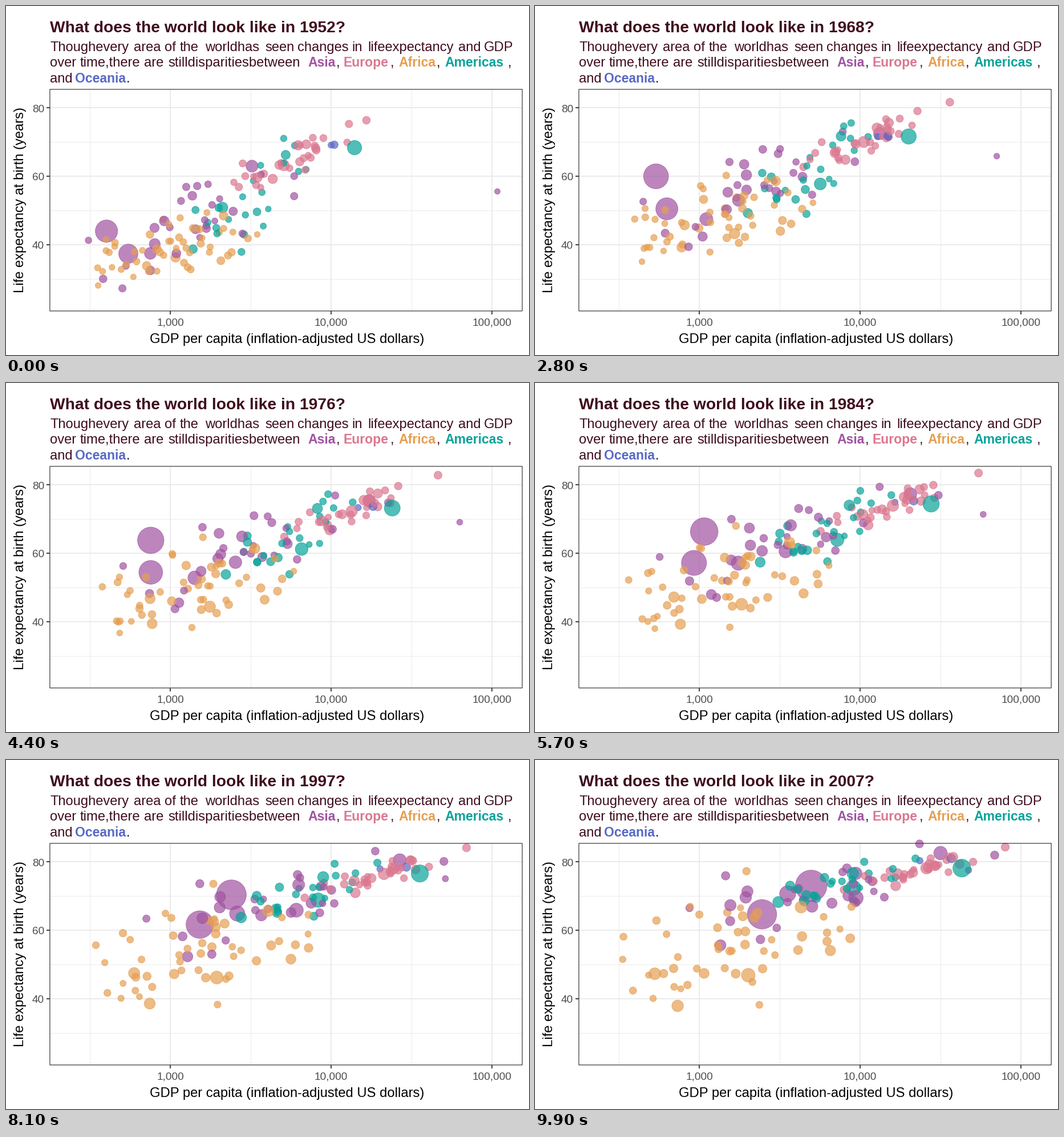
Write a matplotlib script that moves like this. It is 917x611 px and loops after 10 s.

```python
import numpy as np
import matplotlib.pyplot as plt
from matplotlib.animation import FuncAnimation
from matplotlib.colors import to_rgba
from matplotlib.patches import Rectangle

W, H, FRAMES = 917, 611, 100
LEFT, TOP, RIGHT, BOTTOM = 76.9, 145.9, 905.1, 533.9
INK, AXIS, GRID, TICK = "#3F0D1D", "#333333", "#EBEBEB", "#4D4D4D"
COLORS = {"Asia": "#A053A1", "Europe": "#DB778F", "Africa": "#E69F52",
          "Americas": "#09A39A", "Oceania": "#5869C7"}

rng = np.random.default_rng(14)


def to_x(log_gdp):
    return 288.3 + 281.7 * (log_gdp - 3)


def to_y(life):
    return 178.5 + 5.99 * (80 - life)


def radius(pop):
    return 4.6 + 23 * np.sqrt(pop / 1319)


def tween(ends, t, power=1.0):
    a, b = ends
    return a + (b - a) * t ** power


def single(pop, gdp, life, ease):
    """One large country, eased from its first to its last values."""
    ends, logs = radius(np.array(pop)), np.log10(gdp)

    def at(t):
        return ([to_x(tween(logs, t, ease[0]))],
                [to_y(tween(life, t, ease[1]))], [tween(ends, t)])
    return at


def crowd(n, pop, growth, corr, gdp, gdp_sd, life, life_sd, ease):
    """A correlated cloud whose centre and spread follow the trend."""
    def scores():
        z = rng.normal(size=n)
        return np.clip((z - z.mean()) / z.std(), -2, 2)

    u0, u1, v0, v1 = (scores() for _ in range(4))
    pops = pop * 10 ** (.42 * scores())

    def at(t):
        c, s = np.cos(.7 * t), np.sin(.7 * t)
        u = c * u0 + s * u1
        v = corr * u + np.sqrt(1 - corr ** 2) * (c * v0 + s * v1)
        g = tween(gdp, t, ease[0]) + tween(gdp_sd, t) * u
        y = tween(life, t, ease[1]) + tween(life_sd, t) * v
        return to_x(g), to_y(y), tween((radius(pops), radius(pops * growth)), t)
    return at


# Each entry runs from 1952 to 2007: population in millions, GDP, life
# expectancy, and the easing powers of the last two.
GROUPS = [
    ("Asia", 1, single((556, 1319), (400, 4959), (44, 73), (1.7, .47))),
    ("Asia", 1, single((372, 1110), (547, 2452), (37.4, 64.7), (1.9, .58))),
    ("Asia", 1, single((82, 224), (750, 3541), (37.5, 70.7), (1.1, .95))),
    ("Asia", 1, single((86, 127), (3217, 31656), (63, 82.6), (.38, .57))),
    ("Asia", 1, single((.2, 2.5), (108382, 47307), (55.6, 77.6), (.53, .6))),
    ("Africa", 1, single((33, 135), (1077, 2014), (36.3, 46.9), (.3, .33))),
    ("Americas", 1, single((57, 190), (2109, 9066), (50.9, 72.4), (.31, .9))),
    ("Asia", 28, crowd(28, 9, 2.7, .6, (3.13, 3.72), (.32, .46),
                       (46.5, 70.5), (8, 6), (.7, .6))),
    ("Africa", 51, crowd(51, 3.5, 3.4, .4, (3.0, 3.2), (.27, .38),
                         (39, 55), (4.8, 8.5), (.6, .5))),
    ("Europe", 30, crowd(30, 9, 1.3, .85, (3.76, 4.38), (.23, .2),
                         (65, 77.8), (4.8, 2.5), (.6, .6))),
    ("Americas", 23, crowd(23, 4, 2.8, .6, (3.5, 3.88), (.2, .24),
                           (53, 73.5), (8.5, 3.3), (.55, .7))),
    ("Oceania", 2, crowd(2, 4.2, 2.2, .9, (4.01, 4.47), (.01, .07),
                         (69.2, 80.7), (.1, .5), (1, 1.2))),
]
# Continents are mixed in depth, above the giants and below the last bubble.
total = sum(n for _, n, _ in GROUPS)
order = np.append(np.arange(7), 7 + rng.permutation(total - 7))
fills = np.array([to_rgba(COLORS[name], .7)
                  for name, n, _ in GROUPS for _ in range(n)])[order]
top_dog = single((158, 301), (13990, 42952), (68.4, 78.2), (.9, .87))
fills = np.vstack([fills, to_rgba(COLORS["Americas"], .7)])


def state(t):
    """Pixel centres and marker areas of all bubbles."""
    x, y, r = np.hstack([at(t) for _, _, at in GROUPS])[:, order]
    x, y, r = np.hstack([(x, y, r), top_dog(t)])
    return np.column_stack([x, y]), (2 * r) ** 2


# At 72 dpi one point is one pixel.
plt.rcParams["font.family"] = "Liberation Sans"
fig = plt.figure(figsize=((W + .01) / 72, (H + .01) / 72), dpi=72,
                 facecolor="white")
ax = fig.add_axes([0, 0, 1, 1])
ax.set(xlim=(0, W), ylim=(H, 0))
ax.axis("off")


def label(x, y, s, size=23.7, color=INK, **kw):
    return ax.text(x, y, s, fontsize=size, color=color, **kw)


for logs, lives, lw in (((2.5, 3.5, 4.5), (30, 50, 70), 1),
                        ((3, 4, 5), (40, 60, 80), 2)):
    ax.vlines([to_x(g) for g in logs], TOP, BOTTOM, color=GRID, lw=lw, zorder=1)
    ax.hlines([to_y(v) for v in lives], LEFT, RIGHT, color=GRID, lw=lw, zorder=1)
ax.add_patch(Rectangle((LEFT, TOP), RIGHT - LEFT, BOTTOM - TOP, fill=False,
                       ec=AXIS, lw=1.2, zorder=4, snap=False))

for g in (3, 4, 5):
    ax.vlines(to_x(g), BOTTOM, BOTTOM + 6, color=AXIS, lw=1.8)
    label(to_x(g), 559, f"{10 ** g:,}", 19, TICK, ha="center")
for v in (40, 60, 80):
    ax.hlines(to_y(v), LEFT - 6, LEFT, color=AXIS, lw=1.8)
    label(67, to_y(v) + 7, str(v), 19, TICK, ha="right")

label(492.5, 590, "GDP per capita (inflation-adjusted US dollars)",
      color="black", ha="center")
label(31, 339.5, "Life expectancy at birth (years)", color="black",
      rotation=90, ha="center", va="baseline", rotation_mode="anchor")

SUBTITLE = {
    79: [(77, "Thoughevery"), (224, "area"), (278, "of"), (305, "the"),
         (349, "worldhas"), (454, "seen"), (511, "changes"), (606, "in"),
         (634, "lifeexpectancy"), (793, "and"), (838, "GDP")],
    106: [(77, "over"), (130, "time,there"), (242, "are"),
          (284, "stilldisparitiesbetween"), (529, "Asia"), (579, ","),
          (591, "Europe"), (674, ","), (688, "Africa"), (755, ","),
          (769, "Americas"), (880, ",")],
    134: [(77, "and"), (121, "Oceania"), (211, ".")],
}
for y, words in SUBTITLE.items():
    for x, word in words:
        if word in COLORS:
            label(x, y, word, 23, COLORS[word], weight="bold")
        else:
            label(x, y, word)

title = label(77, 46, "", 28.2, weight="bold")
pos, area = state(0)
dots = ax.scatter(*pos.T, s=area, facecolors=fills, edgecolors=fills,
                  linewidths=1, zorder=3)


def draw(i):
    t = i / (FRAMES - 1)
    pos, area = state(t)
    dots.set_offsets(pos)
    dots.set_sizes(area)
    title.set_text(f"What does the world look like in {round(1952 + 55 * t)}?")
    return dots, title


anim = FuncAnimation(fig, draw, frames=FRAMES, interval=100, repeat=True,
                     repeat_delay=0)
plt.show()
```
